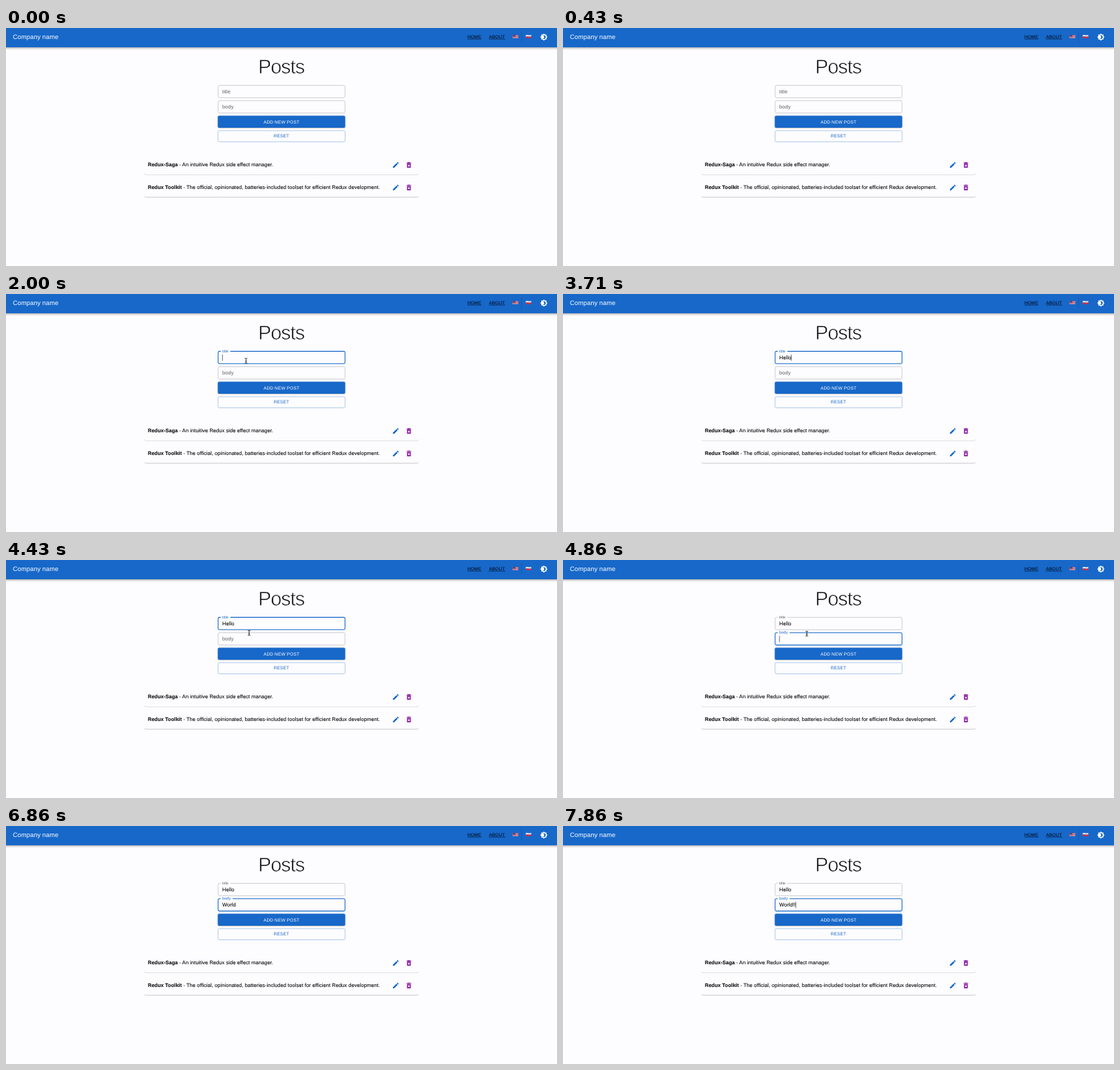
An HTML page for the animation above (8 s loop, 800 by 346 pixels).

```html
<!DOCTYPE html>
<html lang="en">
<head>
<meta charset="utf-8">
<title>Posts</title>
<style>
  :root { --blue: #1768c9; --paper: #fdfcfe; --ink: #0c0c0e; --muted: #5f5e63; --line: #c3c2c7; }
  html, body { margin: 0; height: 100%; overflow: hidden; background: var(--paper); }
  svg { display: block; width: 100vw; height: 100vh; }
  text { font: 7.48px "Liberation Sans", Arial, sans-serif; letter-spacing: .00938em; fill: var(--ink); text-rendering: geometricPrecision; white-space: pre; }
  .brand { font-size: 9.25px; letter-spacing: .0075em; fill: #fff; }
  .heading { font-size: 28.8px; letter-spacing: -.034em; text-anchor: middle; stroke: var(--paper); stroke-width: .75px; }
  .caps { font-size: 6.475px; letter-spacing: .02857em; }
  .mid { text-anchor: middle; }
  .link { fill: #06122a; stroke: #06122a; stroke-width: .12px; }
  .copy, .value { stroke: var(--ink); stroke-width: .1px; }
  .bold { font-size: 7.4px; font-weight: 700; }
  .primary { fill: var(--blue); }
  .card { fill: var(--paper); }
  .outlined { fill: none; stroke: #9dbfe9; stroke-width: .8px; }
  .box { fill: none; stroke: var(--line); stroke-width: .8px; }
  .notch { fill: var(--paper); }
  .label { fill: var(--muted); }
  .floating .label { font-size: 5.55px; }
  .focused .box { stroke: var(--blue); stroke-width: 1.1px; }
  .focused .label { fill: var(--blue); }
  .caret { stroke: #222; stroke-width: .65px; }
</style>
</head>
<body>
<svg id="stage" viewBox="0 0 800 346">
  <defs>
    <path id="pencil" d="M3 17.25V21h3.75L17.81 9.94l-3.75-3.75zM20.71 7.04c.39-.39.39-1.02 0-1.41l-2.34-2.34c-.39-.39-1.02-.39-1.41 0l-1.83 1.83 3.75 3.75z"/>
    <path id="bin" d="M6 19c0 1.1.9 2 2 2h8c1.1 0 2-.9 2-2V7H6zm2.46-7.12 1.41-1.41L12 12.59l2.12-2.12 1.41 1.41L13.41 14l2.12 2.12-1.41 1.41L12 15.41l-2.12 2.12-1.41-1.41L10.59 14zM15.5 4l-1-1h-5l-1 1H5v2h14V4z"/>
    <path id="theme" d="M20 8.69V4h-4.69L12 .69 8.69 4H4v4.69L.69 12 4 15.31V20h4.69L12 23.31 15.31 20H20v-4.69L23.31 12zM12 18c-.89 0-1.74-.2-2.5-.55C11.56 16.5 13 14.42 13 12s-1.44-4.5-3.5-5.45C10.26 6.2 11.11 6 12 6c3.31 0 6 2.69 6 6s-2.69 6-6 6z"/>
  </defs>

  <g id="surfaces"></g>

  <text class="brand" x="10" y="16">Company name</text>
  <text class="caps link" x="670" y="15">HOME</text>
  <text class="caps link" x="701.3" y="15">ABOUT</text>
  <path d="M670 16.1h20.3M701.3 16.1h23.5" stroke="#06122a" stroke-width=".65"/>
  <path d="M748.6 5v16" stroke="#1258ae" stroke-width=".8"/>

  <g transform="translate(735.6 9.8)">
    <path d="M0 .4q2-.6 4 0t4-.2v4.8q-2 .6-4 0t-4 .2z" fill="#dcb9c4"/>
    <path d="M0 .9q2-.6 4 0t4-.2M0 2.5q2-.6 4 0t4-.2M0 4.1q2-.6 4 0t4-.2" fill="none" stroke="#c9364a" stroke-width=".8"/>
    <path d="M0 .4q2-.6 4 0v2.4H0z" fill="#3d4680"/>
  </g>
  <g transform="translate(754.6 9.8)">
    <path d="M0 .4q2-.6 4 0t4-.2v2.6H0z" fill="#efe9f0"/>
    <path d="M0 2.7q2-.6 4 0t4-.2v2.5q-2 .6-4 0t-4 .2z" fill="#d03049"/>
  </g>
  <use href="#theme" transform="translate(775.4 7.6) scale(.4625)" fill="#fff"/>

  <text class="heading" x="399.6" y="66">Posts</text>
  <g id="fields"></g>

  <text class="caps mid" x="400" y="138.5" style="fill:#fff">ADD NEW POST</text>
  <rect class="outlined" x="307.9" y="149.2" width="184.4" height="16.2" rx="1.85"/>
  <text class="caps mid" x="400" y="159.4" style="fill:var(--blue)">RESET</text>

  <g id="cards"></g>

  <path id="arrow" d="M0 0v7.2l1.7-1.5 1.1 2.5 1.2-.5-1.1-2.5h2.2z" fill="#111" stroke="#fff" stroke-width=".5"/>
  <path id="beam" d="M-1.8-3.6q1.8 0 1.8 1.1 0-1.1 1.8-1.1M0-2.5v5M-1.8 3.6q1.8 0 1.8-1.1 0 1.1 1.8 1.1M-.9.9h1.8" fill="none" stroke="#111" stroke-width=".85"/>
</svg>

<script>
const $ = id => document.getElementById(id);
const LOOP = 8000, STEPS_PER_MS = 7 / 1000, SCALE = .4625;

// Material shadow layers in CSS pixels: [offset, blur, spread, alpha].
const shadows = {
  low: [[2, 1, -1, .2], [1, 1, 0, .14], [1, 3, 0, .12]],
  mid: [[3, 1, -2, .2], [2, 2, 0, .14], [1, 5, 0, .12]],
  high: [[2, 4, -1, .2], [4, 5, 0, .14], [1, 10, 0, .12]]
};

// Steps at which each successive character appears.
const fields = [
  { name: "title", y: 83, value: "Hello", focus: 13, blur: 32, keys: [17, 19, 21, 23, 26] },
  { name: "body", y: 105.3, value: "World!!", focus: 32, blur: 99, keys: [36, 38, 40, 42, 44, 53, 55] }
];

const posts = [
  ["Redux-Saga", "An intuitive Redux side effect manager."],
  ["Redux Toolkit", "The official, opinionated, batteries-included toolset for efficient Redux development."]
];
const cardY = i => 184.8 + i * 32.8;

// Pointer trips: [step, x, y]; hidden while typing.
const trips = [
  [[4, 462, 340], [6, 441, 210], [8, 428, 153], [9, 414, 139], [11, 364, 104], [13, 348.5, 97], [16, 348.5, 97]],
  [[28, 348.5, 97], [31, 353, 106], [32, 354, 107], [35, 354, 107]]
];

function surface(kind, x, y, w, h, radius, layers) {
  const rect = (grow, dy, attrs) =>
    `<rect x="${x - grow}" y="${y - grow + dy}" width="${w + 2 * grow}" height="${h + 2 * grow}" rx="${radius}" ${attrs}/>`;
  return layers.map(([dy, blur, spread, alpha]) =>
    rect(spread * SCALE, dy * SCALE, `fill-opacity="${alpha}" style="filter:blur(${blur * SCALE / 2}px)"`)
  ).join("") + rect(0, 0, `class="${kind}"`);
}

$("surfaces").innerHTML =
  surface("primary", -10, -10, 820, 38, 0, shadows.high) +
  surface("primary", 307.5, 127.6, 185, 17.3, 1.85, shadows.mid) +
  posts.map((_, i) => surface("card", 201, cardY(i), 398, 28.1, 1.85, shadows.low)).join("");

$("fields").innerHTML = fields.map(f => `
  <g id="${f.name}">
    <rect class="box" x="308" y="${f.y + .4}" width="184.2" height="17.9" rx="1.85"/>
    <rect class="notch" x="311.8" y="${f.y - 1}" height="3"/>
    <text class="label" x="314">${f.name}</text>
    <text class="value" x="314" y="${f.y + 11.6}"></text>
    <path class="caret" d="M0 ${f.y + 5}v9"/>
  </g>`).join("");

$("cards").innerHTML = posts.map(([title, body], i) => `
  <g transform="translate(201 ${cardY(i)})">
    <text class="copy" x="5" y="16.7"><tspan class="bold">${title}</tspan> - ${body}</text>
    <use href="#pencil" transform="translate(359.4 8.8) scale(${SCALE})" fill="#1768c9"/>
    <use href="#bin" transform="translate(378.4 8.8) scale(${SCALE})" fill="#8c1ca3"/>
  </g>`).join("");

function drawField(f, step) {
  const group = $(f.name), part = name => group.querySelector("." + name);
  const focused = step >= f.focus && step < f.blur;
  const floating = step >= f.focus;
  group.classList.toggle("focused", focused);
  group.classList.toggle("floating", floating);

  const label = part("label"), value = part("value"), caret = part("caret");
  label.setAttribute("y", f.y + (floating ? 2 : 11.6));
  part("notch").setAttribute("width", floating ? label.getComputedTextLength() + 5 : 0);

  const pressed = f.keys.filter(k => k <= step);
  value.textContent = f.value.slice(0, pressed.length);
  const lastInput = pressed.length ? pressed.at(-1) : f.focus;
  const lit = (step - lastInput) % 8 < 4;
  const x = pressed.length ? value.getComputedTextLength() : .3;
  caret.setAttribute("transform", `translate(${314 + x} 0)`);
  caret.style.display = focused && lit ? "" : "none";
}

function pointerAt(step) {
  const trip = trips.find(t => step >= t[0][0] && step <= t.at(-1)[0]);
  if (!trip) return null;
  const i = Math.max(1, trip.findIndex(p => p[0] >= step));
  const [a, b] = [trip[i - 1], trip[i]];
  const k = (step - a[0]) / (b[0] - a[0]);
  return { x: a[1] + (b[1] - a[1]) * k, y: a[2] + (b[2] - a[2]) * k };
}

function drawPointer(step) {
  const p = pointerAt(step);
  const overField = p && p.x > 307 && p.x < 493 && fields.some(f => p.y >= f.y && p.y <= f.y + 19);
  for (const [id, shown] of [["arrow", p && !overField], ["beam", overField]]) {
    $(id).style.display = shown ? "" : "none";
    if (shown) $(id).setAttribute("transform", `translate(${p.x} ${p.y})`);
  }
}

const start = performance.now();
let shownStep = -1;
function tick() {
  const time = (performance.now() - start) % LOOP;
  const step = Math.floor((time + 5) * STEPS_PER_MS);
  if (step !== shownStep) {
    shownStep = step;
    fields.forEach(f => drawField(f, step));
    drawPointer(step);
  }
  requestAnimationFrame(tick);
}
tick();
</script>
</body>
</html>
```
